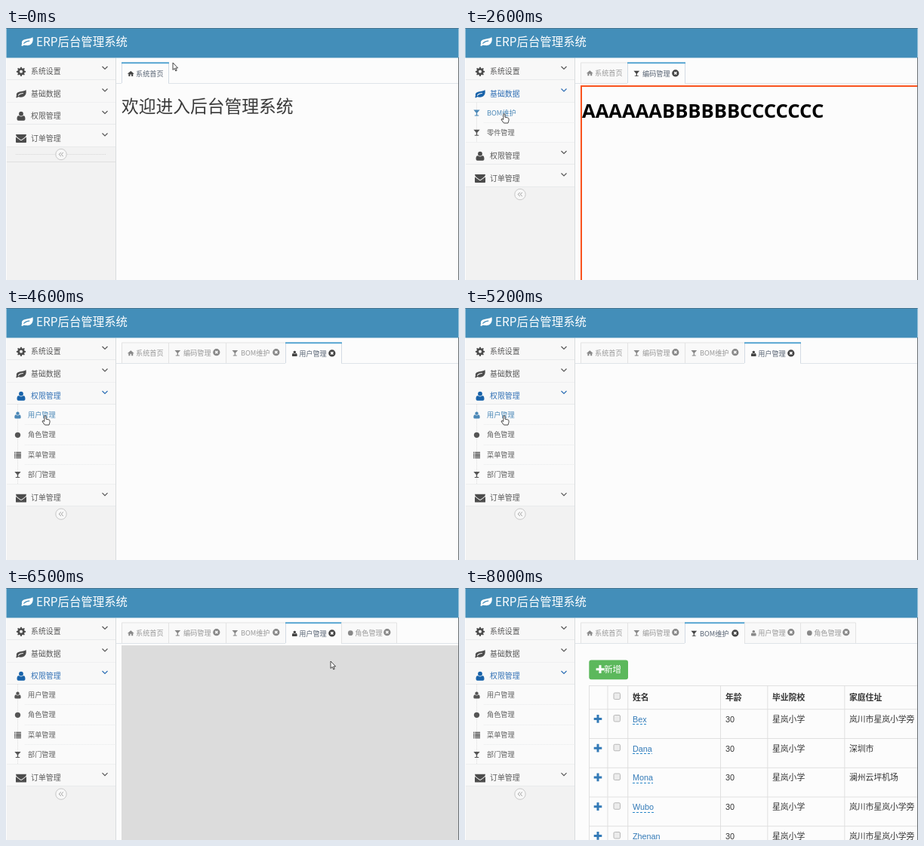
These frames come from a looping animation (600 by 334 pixels, 9700 ms). An HTML page with a canvas:

```html
<!DOCTYPE html>
<html lang="zh-CN">
<head>
<meta charset="utf-8">
<title>ERP后台管理系统</title>
<style>
html, body { margin: 0; width: 100%; height: 100%; overflow: hidden; background: #fcfcfc; }
canvas { display: block; width: 100vw; height: 100vh; }
</style>
</head>
<body>
<canvas id="stage" width="600" height="334"></canvas>
<script>
const ctx = document.getElementById("stage").getContext("2d");
const LOOP = 9700, STEP = 100;
const UI = '"Noto Sans CJK SC", "Noto Sans CJK", sans-serif';
const GRID = '"Liberation Sans", "Noto Sans CJK SC", sans-serif';
const BLUE = "#2f6fb5", PAGE = "#fcfcfc", LINE = "#dddddd", SOFT = "#e8eaeb";

// Icons live in a box of about 12 units around 0,0.
const circle = (x, y, r) => `M${x - r},${y}a${r},${r} 0 1 0 ${2 * r},0a${r},${r} 0 1 0 ${-2 * r},0z`;
const gear = () => {
  let d = "";
  for (let i = 0; i < 32; i++) {
    const a = (i - 0.5) * Math.PI / 16, r = i % 4 < 2 ? 6.2 : 4.6;
    d += (i ? "L" : "M") + (r * Math.cos(a)).toFixed(2) + "," + (r * Math.sin(a)).toFixed(2);
  }
  return d + "z" + circle(0, 0, 2);
};
const icons = {
  gear: gear(),
  leaf: "M6.4,-5.3C8,1 4,5 -1,4.4C-3,4.1 -4,3.4 -5.2,5.3L-6.8,4.6C-5.6,3 -6.2,2 -6.2,.8C-5.6,-4.4 3,-2 6.4,-5.3z" +
    "M-3.8,2.6C-1.8,.6 .3,0 2.8,-.3L2.9,-1.2C0,-1.2 -2.6,-.2 -4.3,2z",
  user: circle(0, -3.1, 2.9) +
    "M-5.5,4C-5.5,0 -4,-.5 -3,-.5C-1.5,1 1.5,1 3,-.5C4,-.5 5.5,0 5.5,4Q5.5,6 3.5,6H-3.5Q-5.5,6 -5.5,4z",
  mail: "M-7,-5.2H7Q7,-3 5,-1.5L1,1.5Q0,2.2 -1,1.5L-5,-1.5Q-7,-3 -7,-5.2z" +
    "M-7,-1.8L-1.5,2.3Q0,3.4 1.5,2.3L7,-1.8V5Q7,5.6 6,5.6H-6Q-7,5.6 -7,5z",
  glass: "M-5.5,-5.2H5.5L.9,0V4H3.6V5.3H-3.6V4H-.9V0z",
  home: "M0,-5L6,.3L5.3,1L4.2,.2V5H1.2V1.5H-1.2V5H-4.2V.2L-5.3,1L-6,.3z",
  list: [-5, -2, 1, 4].map(y => `M-6,${y}h2v2h-2zM-3,${y}h9v2h-9z`).join(""),
  dot: circle(0, 0, 4.8),
  close: circle(0, 0, 6) + "M-2.8,-1.4L-1.4,-2.8L0,-1.4L1.4,-2.8L2.8,-1.4L1.4,0L2.8,1.4L1.4,2.8L0,1.4L-1.4,2.8L-2.8,1.4L-1.4,0z",
  plus: "M-1.7,-6h3.4v4.3H6v3.4H1.7V6h-3.4V1.7H-6v-3.4h4.3z",
  arrow: "M0,0V9.5L2.2,7.5L3.8,11L5.2,10.3L3.7,7H6.6z",
  hand: "M-1.2,.8Q-1.2,-.3 -.1,-.3Q1,-.3 1,.8V4.2L4.8,5Q6,5.3 6,6.6V8.5Q5.5,10 5,12H-.5L-3.6,8Q-4.4,6.6 -3,6.4L-1.2,7.4z"
};
for (const k in icons) icons[k] = new Path2D(icons[k]);

const menu = [
  { label: "系统设置", icon: "gear", open: 600, shut: 2300, subs: [["编码管理", "glass"]] },
  { label: "基础数据", icon: "leaf", open: 2300, shut: 3800, subs: [["BOM维护", "glass"], ["零件管理", "glass"]] },
  { label: "权限管理", icon: "user", open: 3800, shut: LOOP,
    subs: [["用户管理", "user"], ["角色管理", "dot"], ["菜单管理", "list"], ["部门管理", "glass"]] },
  { label: "订单管理", icon: "mail", open: LOOP, shut: LOOP, subs: [] }
];
const tabs = [
  { label: "系统首页", icon: "home", x: 153, end: 215, at: 0 },
  { label: "编码管理", icon: "glass", x: 215, end: 291, at: 1100 },
  { label: "BOM维护", icon: "glass", x: 291, end: 370, at: 2900 },
  { label: "用户管理", icon: "user", x: 370, end: 444, at: 4400 },
  { label: "角色管理", icon: "dot", x: 444, end: 517, at: 5600 }
];
const tabAt = [[0, 0], [1100, 1], [2900, 2], [4400, 3], [5600, 4], [6400, 3], [7400, 2]];
const pageAt = [[0, "home"], [1100, ""], [1300, "codes"], [2900, ""], [3100, "table"], [4400, ""],
  [5300, "grey"], [5600, ""], [6400, "grey"], [7400, "table"]];
const mouse = [[0, 221, 46], [500, 70, 56], [700, 66, 58], [1000, 55, 84], [1800, 55, 84], [2200, 56, 112],
  [2500, 52, 114], [3400, 52, 114], [3800, 62, 164], [4000, 62, 160], [4300, 52, 143], [5200, 52, 143],
  [5500, 52, 168], [6100, 52, 168], [6300, 317, 123], [6400, 418, 62], [6500, 430, 97], [6700, 430, 97],
  [7000, 338, 60], [7200, 345, 58], [7400, 345, 58], [8000, 640, 210]];
const people = [["Bex", "星岚小学", "岚川市星岚小学旁"], ["Dana", "星岚小学", "深圳市"], ["Mona", "星岚小学", "澜州云坪机场"],
  ["Wubo", "星岚小学", "岚川市星岚小学旁"], ["Zhenan", "星岚小学", "岚川市星岚小学旁"]];

const ramp = (t, a, b) => Math.max(0, Math.min(1, (t - a) / (b - a)));
const latest = (list, t) => list.filter(e => e[0] <= t).pop()[1];

function mouseAt(t) {
  const i = mouse.findIndex(m => m[0] > t);
  if (i < 0) return { x: 640, y: 210 };
  const [t0, x0, y0] = mouse[i - 1], [t1, x1, y1] = mouse[i];
  const k = ramp(t, t0, t1);
  return { x: x0 + (x1 - x0) * k, y: y0 + (y1 - y0) * k };
}
function rect(x, y, w, h, color) {
  ctx.fillStyle = color;
  ctx.fillRect(x, y, w, h);
}
function text(s, x, mid, size, color, family = UI, weight = "") {
  ctx.font = `${weight} ${size}px ${family}`;
  ctx.fillStyle = color;
  ctx.fillText(s, x, mid + size * 0.37);
}
function stroke(points, color, width = 1, dash = []) {
  ctx.beginPath();
  points.forEach(([x, y]) => ctx.lineTo(x, y));
  ctx.strokeStyle = color;
  ctx.lineWidth = width;
  ctx.setLineDash(dash);
  ctx.stroke();
  ctx.setLineDash([]);
}
function icon(name, x, y, scale, color, outline) {
  ctx.save();
  ctx.translate(x, y);
  ctx.scale(scale, scale);
  ctx.fillStyle = color;
  ctx.fill(icons[name], "evenodd");
  if (outline) {
    ctx.strokeStyle = outline;
    ctx.lineWidth = 0.9;
    ctx.stroke(icons[name]);
  }
  ctx.restore();
}

function drawHeader() {
  rect(0.5, 0, 599, 39.5, "#438eb9");
  rect(0.5, 0, 599, 1, "#4a7691");
  icon("leaf", 28, 18, 1.15, "#fff");
  text("ERP后台管理系统", 40, 18.3, 15.4, "#fff", UI, 500);
}

function drawSubs(item, y, height, pos) {
  let over = false;
  ctx.save();
  ctx.beginPath();
  ctx.rect(1, y, 144, height);
  ctx.clip();
  rect(1, y, 144, height, "#fafafa");
  stroke([[15.5, y], [15.5, y + height]], LINE, 1, [1, 1]);
  item.subs.forEach(([label, name], i) => {
    const top = y + i * 26.3, mid = top + 13.7;
    const hot = pos.x < 145 && pos.y >= top && pos.y < Math.min(top + 26.3, y + height);
    over = over || hot;
    if (i) stroke([[25, Math.round(top) + 0.5], [145, Math.round(top) + 0.5]], SOFT, 1, [1, 1]);
    icon(name, 15.5, mid + 0.3, 0.76, hot ? "#4b88b7" : "#555");
    text(label, 29, mid, 9.2, hot ? "#4b88b7" : "#616161");
  });
  ctx.restore();
  return over;
}

function drawSidebar(t, pos) {
  let y = 39.5, over = false;
  rect(1, y, 144, 294.5, "#f2f2f2");
  for (const item of menu) {
    const mid = y + 18;
    const hot = pos.x < 145 && pos.y >= y && pos.y < y + 29.5;
    const lit = hot || (t > item.open && t <= item.shut);
    const color = lit ? BLUE : "#585858";
    rect(1, y, 144, 29.5, "#f8f8f8");
    if (hot) rect(1, y, 2.5, 29.5, "#3382af");
    icon(item.icon, 20, mid + 0.3, 1, lit ? "#1963aa" : "#4c4c4c");
    text(item.label, 33, mid, 9.9, color);
    stroke([[127.5, mid - 6.5], [131, mid - 3], [134.5, mid - 6.5]], color, 1.2);
    y += 29.5;
    rect(1, Math.round(y) - 1, 144, 1, SOFT);
    const k = ramp(t, item.open, item.open + 250) - ramp(t, item.shut, item.shut + 250);
    if (k > 0 && item.subs.length) {
      const height = k * (26.3 * item.subs.length + 0.4);
      over = drawSubs(item, y, height, pos) || over;
      y += height;
      rect(1, Math.round(y) - 1, 144, 1, SOFT);
    }
  }
  if (y === 157.5) {
    stroke([[13, 167.5], [133, 167.5]], "#d6d6d6", 1, [1, 1]);
    rect(1, 177, 144, 1, "#e0e0e0");
  }
  const mid = y + 10;
  ctx.beginPath();
  ctx.arc(73, mid, 7.2, 0, 7);
  ctx.fillStyle = "#f8f8f8";
  ctx.fill();
  ctx.strokeStyle = "#c8c8c8";
  ctx.lineWidth = 1;
  ctx.stroke();
  for (const x of [70.2, 73.2]) stroke([[x + 2.6, mid - 2.6], [x, mid], [x + 2.6, mid + 2.6]], "#999", 1);
  rect(145, 39.5, 1, 294.5, "#d9dcde");
  return over;
}

function drawTabs(t) {
  const active = latest(tabAt, t);
  rect(146, 73, 453, 1, "#dfe4e9");
  tabs.forEach((tab, i) => {
    if (t < tab.at) return;
    const on = i === active, { x, end } = tab, mid = on ? 60.2 : 59.5;
    const color = on ? "#576373" : "#999";
    rect(x, 45.5, end - x, on ? 28.5 : 27.5, on ? PAGE : "#f9f9f9");
    const l = x + 0.5, r = end + 0.5;
    stroke([[l, 73], [l, 46], [r, 46], [r, 73]], on ? "#d3dbe4" : "#e3e3e3");
    if (on) rect(x, 45.4, end - x + 1, 1.8, "#4aa0d0");
    icon(tab.icon, x + 12.3, mid + 0.2, tab.icon === "user" ? 0.62 : 0.7, on ? "#444" : "#888");
    const left = x + (tab.icon === "glass" ? 20 : i ? 18.2 : 19);
    text(tab.label, left, mid, 9.15, color);
    if (i) icon("close", end - 12.2, mid - (on ? 0.3 : 0.8), 0.77, on ? "#444" : "#888");
  });
}

function checkbox(y) {
  ctx.beginPath();
  ctx.roundRect(197, y - 4, 8.5, 8.5, 1.5);
  ctx.fillStyle = "#ececec";
  ctx.fill();
  ctx.strokeStyle = "#b0b0b0";
  ctx.lineWidth = 0.9;
  ctx.stroke();
}

function drawTable() {
  const cols = [222, 345, 407, 509], pitch = 38.75;
  ctx.beginPath();
  ctx.roundRect(164.3, 95.4, 51.7, 25.8, 3);
  ctx.fillStyle = "#5cb85c";
  ctx.fill();
  icon("plus", 179, 107.7, 0.9, "#fff");
  text("新增", 184, 107.8, 11.6, "#fff");

  rect(164, 129.2, 435, 0.9, LINE);
  for (const x of [164, 188.5, 215.3, 338, 400.4, 502.4]) rect(x, 129.2, 0.9, 205, LINE);
  ["姓名", "年龄", "毕业院校", "家庭住址"].forEach((s, i) => text(s, cols[i], 145, 10.8, "#333", GRID, "bold"));
  checkbox(143);
  people.forEach(([name, school, home], i) => {
    const top = 160.3 + i * pitch, mid = top + 13.5;
    rect(164, top, 435, 0.9, LINE);
    icon("plus", 176, mid - 0.4, 0.88, "#337ab7");
    checkbox(mid - 1.3);
    text(name, cols[0], mid, 10.8, "#337ab7", GRID);
    const w = ctx.measureText(name).width, base = Math.round(mid + 6.5) + 0.5;
    stroke([[cols[0], base], [cols[0] + w, base]], "#2b88c8", 1, [3, 2]);
    [30, school, home].forEach((s, c) => text(s, cols[c + 1], mid, 10.8, "#333", GRID));
  });
}

const pages = {
  home: () => text("欢迎进入后台管理系统", 153, 104, 22.75, "#393939"),
  codes() {
    rect(153, 76, 446, 2, "#f9531e");
    rect(153, 76, 2, 258, "#f9531e");
    text("AAAAAABBBBBBCCCCCCC", 155, 109.5, 25.6, "#000", '"Open Sans", sans-serif', "bold");
  },
  table: drawTable,
  grey: () => rect(153, 76, 446, 258, "#dcdcdc")
};

function draw(t) {
  const pos = mouseAt(t), page = latest(pageAt, t);
  rect(0, 0, 600, 334, PAGE);
  const overSub = drawSidebar(t, pos);
  drawTabs(t);
  if (page) pages[page]();
  rect(599, 39, 1, 295, "#6a6f73");
  drawHeader();
  const overTab = pos.y > 46 && pos.y < 72 && tabs.some(b => t >= b.at && pos.x > b.x && pos.x < b.end);
  icon(overSub || overTab ? "hand" : "arrow", pos.x, pos.y, 1, "#fff", "#333");
}

function tick(now) {
  draw(Math.floor(now % LOOP / STEP) * STEP);
  requestAnimationFrame(tick);
}
draw(0);
requestAnimationFrame(tick);
</script>
</body>
</html>
```
